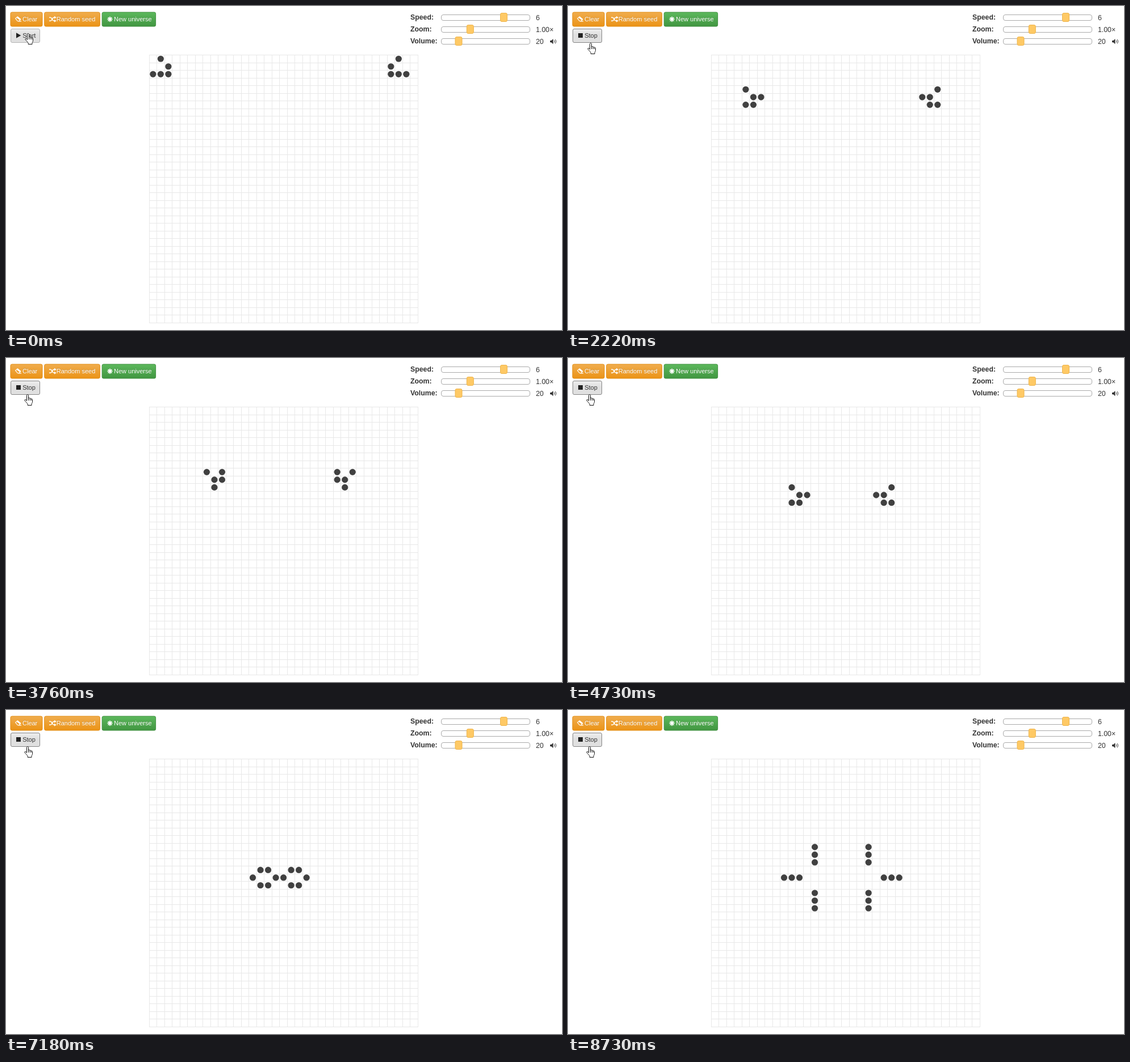
Write an HTML page that moves like this. It is 979 by 572 pixels and loops after 8.83 s.

```html
<!DOCTYPE html>
<html lang="en">
<head>
<meta charset="utf-8">
<title>Life</title>
<style>
html, body { margin: 0; width: 100%; height: 100%; overflow: hidden; background: #fff; }
svg { display: block; width: 979px; height: 572px; }
text { font-family: "Liberation Sans", Arial, sans-serif; }
.button { font-size: 11px; fill: #fff; text-shadow: 0 -1px 0 rgba(0,0,0,.15); }
.dark { fill: #333; text-shadow: none; }
.label { font-size: 12.3px; font-weight: bold; fill: #333; }
.value { font-size: 12.3px; fill: #333; }
</style>
</head>
<body>
<svg viewBox="0 0 979 572">
  <defs>
    <linearGradient id="orange" x2="0" y2="1"><stop stop-color="#f0ad4e"/><stop offset="1" stop-color="#eb9316"/></linearGradient>
    <linearGradient id="green" x2="0" y2="1"><stop stop-color="#5cb85c"/><stop offset="1" stop-color="#419641"/></linearGradient>
    <linearGradient id="grey" x2="0" y2="1"><stop stop-color="#ededed"/><stop offset=".45" stop-color="#e0e0e0"/></linearGradient>
  </defs>
  <g id="panel"></g>
  <path id="grid" fill="none" stroke="#e8e8e8"/>
  <g id="cells" fill="#404040"></g>

  <!-- eraser, shuffle, burst -->
  <path d="M16.6 22.2 20.2 18.8 26 23.4 22.6 26.8H20.6z" fill="none" stroke="#fff" stroke-width="1.1" stroke-linejoin="round"/>
  <path d="M18.4 20.5 20.2 18.8 26 23.4 24.3 25.1zM22 26.3h5v1.1h-5z" fill="#fff"/>
  <path d="M76 20.3h2.3c2.6 0 3.4 6 6 6h1.5M76 26.3h2.3c2.6 0 3.4-6 6-6h1.5" fill="none" stroke="#fff" stroke-width="1.6"/>
  <path d="M85 17.8 88.6 20.3 85 22.8zM85 23.8 88.6 26.3 85 28.8z" fill="#fff"/>
  <g id="burst" stroke="#fff" stroke-width="1.7"></g>

  <!-- speaker -->
  <path d="M958 60.9h2.2l3.2-2.9v9.2l-3.2-2.9H958z" fill="#333"/>
  <path d="M965.2 60.6q1.8 2 0 4M966.9 58.9q3.2 3.7 0 7.4" fill="none" stroke="#333"/>

  <rect id="toggle" x="8.5" y="40.5" width="51" height="24" rx="2.5"/>
  <path id="symbol" fill="#222"/>
  <text id="caption" class="button dark" x="29.2" y="56"></text>
  <path id="hand" fill="#fff" stroke="#111" stroke-linejoin="round"
    d="M4.5 11.5V2.2C4.5 1.2 5.1.5 6 .5s1.5.7 1.5 1.7V7c.4-.9 2.6-.7 2.7.6.5-.8 2.3-.4 2.4.8.6-.6 1.9-.1 1.9 1.1v4c0 2-1.5 2.6-1.5 4v2H6.2v-2c0-1-4.2-4.8-5.2-6.5-.6-1.2.9-2.2 2-1.2zM7.5 7v4M10.2 7.8V11M12.6 8.6V11"/>
</svg>
<script>
const DURATION = 8830, LEFT = 252.1, TOP = 86.5, CELL = 13.514, SIZE = 35;
const byId = id => document.getElementById(id);

function add(parent, tag, attrs, text = "") {
  const node = document.createElementNS("http://www.w3.org/2000/svg", tag);
  for (const key in attrs) node.setAttribute(key, attrs[key]);
  node.textContent = text;
  return parent.appendChild(node);
}

function addButton(x, width, fill, stroke, textX, text) {
  add(byId("panel"), "rect", { x, y: 11, width, height: 25, rx: 2.5, fill: `url(#${fill})`, stroke });
  add(byId("panel"), "text", { x: textX, y: 27, class: "button" }, text);
}

function addSlider(y, name, value, knob) {
  const panel = byId("panel");
  add(panel, "text", { x: 712, y: y + 4, class: "label" }, name);
  add(panel, "rect", { x: 766.5, y: y - 4.5, width: 156, height: 10, rx: 3.5, fill: "#fff", stroke: "#aaa" });
  add(panel, "rect", { x: knob - 6, y: y - 7.5, width: 12, height: 15, rx: 2.5, fill: "#fec965", stroke: "#eeb44c" });
  add(panel, "text", { x: 933, y: y + 5.3, class: "value" }, value);
}

addButton(8, 56, "orange", "#e38d13", 29, "Clear");
addButton(67.7, 97.6, "orange", "#e38d13", 88.8, "Random seed");
addButton(169.2, 94.4, "green", "#3e8f3e", 190, "New universe");
addSlider(20, "Speed:", "6", 876.5);
addSlider(41, "Zoom:", "1.00×", 817.3);
addSlider(62, "Volume:", "20", 797);

for (let i = 0; i < 4; i++) {
  const a = i * Math.PI / 4, dx = 4.6 * Math.cos(a), dy = 4.6 * Math.sin(a);
  add(byId("burst"), "path", { d: `M${183 - dx} ${23.3 - dy}L${183 + dx} ${23.3 + dy}` });
}

let lines = "";
for (let i = 0; i <= SIZE; i++) {
  const x = Math.floor(LEFT + i * CELL) + .5, y = Math.floor(TOP + i * CELL) + .5;
  lines += `M${x} 86v474M252 ${y}h474`;
}
byId("grid").setAttribute("d", lines);

// Conway's rules on cells stored as row * SIZE + column
function nextGeneration(alive) {
  const counts = new Map();
  for (const cell of alive)
    for (const dy of [-SIZE, 0, SIZE])
      for (const dx of [-1, 0, 1])
        if (dx || dy) counts.set(cell + dx + dy, (counts.get(cell + dx + dy) || 0) + 1);
  return new Set([...counts].filter(([cell, n]) => n === 3 || n === 2 && alive.has(cell)).map(([cell]) => cell));
}

const glider = [[1, 0], [2, 1], [0, 2], [1, 2], [2, 2]];
const generations = [new Set(glider.flatMap(([x, y]) => [y * SIZE + x, y * SIZE + 33 - x]))];
while (generations.length < 76) generations.push(nextGeneration(generations.at(-1)));

// Steady runs: start ms, end ms, first generation, last generation
const runs = [
  [690, 1260, 1, 7], [1450, 1450, 8, 8], [1560, 2020, 9, 14], [2220, 2880, 15, 22],
  [3090, 3860, 23, 31], [4050, 4160, 33, 34], [4350, 4730, 35, 39], [4840, 4840, 40, 40],
  [5030, 5140, 42, 43], [5330, 5810, 44, 49], [6010, 6010, 51, 51], [6200, 6700, 52, 57],
  [6890, 7750, 58, 67], [7950, 8530, 68, 74], [8730, 8730, 75, 75]
];
const handPath = [[0, 33, 48], [110, 33, 60], [880, 34, 65], [2500, 33, 65], [3480, 32, 64]];

function generationAt(t) {
  const run = runs.findLast(r => r[0] <= t);
  if (!run) return 0;
  const [start, end, first, last] = run;
  if (t >= end) return last;
  return first + Math.floor((t - start) / (end - start) * (last - first) + 1e-6);
}

let shown = -1;
function drawCells(generation) {
  if (generation === shown) return;
  shown = generation;
  byId("cells").textContent = "";
  for (const cell of generations[generation]) {
    const cx = LEFT + (cell % SIZE + .5) * CELL;
    const cy = TOP + (Math.floor(cell / SIZE) + .5) * CELL;
    add(byId("cells"), "circle", { cx, cy, r: 5.6 });
  }
}

function draw(t) {
  drawCells(generationAt(t));
  const pressed = t >= 410 && t < 500, running = t >= 500;
  byId("toggle").setAttribute("fill", pressed ? "#d8d8d8" : "url(#grey)");
  byId("toggle").setAttribute("stroke", t < 410 ? "#b5b5b5" : "#858585");
  byId("symbol").setAttribute("d", running ? "M18 48h8v8h-8z" : "M18 47.3 26.3 52 18 56.7z");
  byId("caption").textContent = running ? "Stop" : "Start";
  const [, x, y] = handPath.findLast(p => p[0] <= t);
  byId("hand").setAttribute("transform", `translate(${x} ${y})`);
}

const begin = performance.now();
function tick() {
  draw((performance.now() - begin) % DURATION);
  requestAnimationFrame(tick);
}
tick();
</script>
</body>
</html>
```
